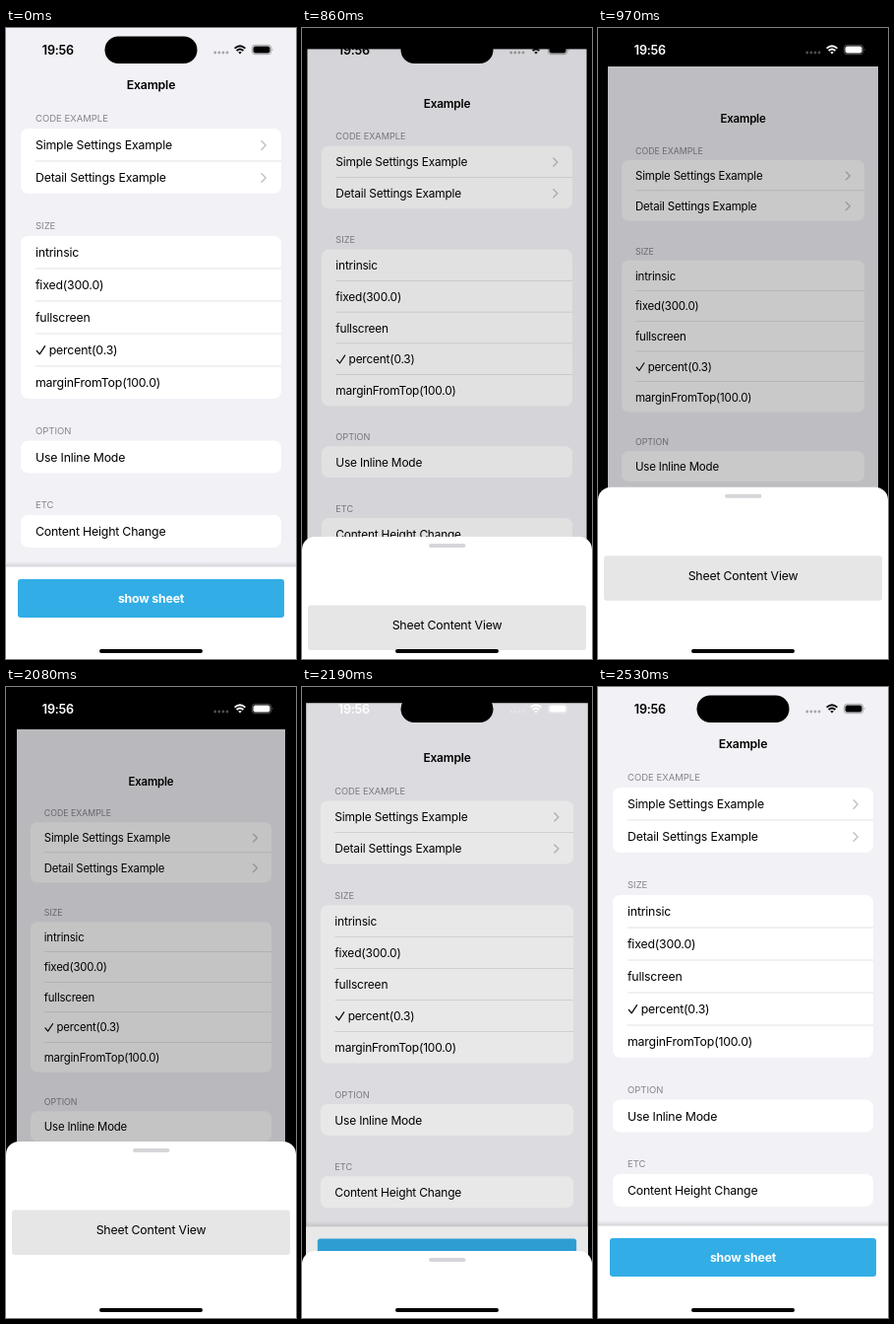
Animation, 295 px wide and 640 px high, one loop 3.33 s. Source, as an HTML page:

```html
<!DOCTYPE html>
<html lang="en">
<head>
<meta charset="utf-8">
<title>Sheet example</title>
<style>
html, body { margin: 0; width: 100%; height: 100%; overflow: hidden; background: #000; }
svg { display: block; width: 100%; height: 100%; }
text { font-family: Inter, sans-serif; font-size: 12.35px; letter-spacing: -.2px; }
.head { font-size: 9.5px; letter-spacing: 0; fill: #85858b; }
.bold { font-weight: 600; }
.mid { text-anchor: middle; }
.line { fill: none; stroke-linecap: round; stroke-linejoin: round; }
</style>
</head>
<body>
<svg viewBox="0 0 295 640">
  <defs>
    <linearGradient id="shade" x1="0" y1="0" x2="0" y2="1">
      <stop offset="0" stop-opacity="0"/>
      <stop offset="1" stop-opacity=".13"/>
    </linearGradient>
  </defs>
  <rect width="295" height="640"/>

  <g id="page">
    <rect width="295" height="640" fill="#f1f1f6"/>
    <text class="bold mid" x="147.5" y="61.5">Example</text>
    <g id="list"></g>
    <rect y="541" width="295" height="6" fill="url(#shade)"/>
    <rect y="546.5" width="295" height="93.5" fill="#fff"/>
    <g id="button">
      <rect x="12" y="559" width="271" height="39" rx="3" fill="#32ade6"/>
      <text class="mid" x="147.5" y="583" fill="#fff" font-weight="700">show sheet</text>
    </g>
    <rect id="dim" width="295" height="640"/>
  </g>

  <rect x="100.5" y="8.5" width="94" height="27.5" rx="13.75"/>
  <g id="status">
    <text class="bold" x="36.8" y="26.5" style="font-size:12.6px">19:56</text>
    <g opacity=".3">
      <circle cx="212.7" cy="25" r="1.4"/><circle cx="216.8" cy="25" r="1.4"/>
      <circle cx="220.9" cy="25" r="1.4"/><circle cx="225" cy="25" r="1.4"/>
    </g>
    <g class="line" stroke="currentColor" stroke-width="1.8" style="stroke-linecap:butt">
      <path d="M232.6 20.6Q238 15.8 243.4 20.6"/>
      <path d="M234.6 23Q238 20 241.4 23"/>
    </g>
    <path d="M236.2 24.6Q238 23.2 239.8 24.6L238 26.6Z"/>
    <rect x="250.3" y="17.3" width="19.4" height="9.4" rx="3" fill="none" stroke="currentColor" stroke-width=".8" opacity=".4"/>
    <rect x="251.5" y="18.5" width="17" height="7" rx="2"/>
    <path d="M270.8 20.5q1.4 1.5 0 3z" opacity=".45"/>
  </g>

  <g id="sheet">
    <rect width="295" height="260" rx="13" fill="#fff"/>
    <rect x="129" y="7" width="37.5" height="4" rx="2" fill="#d6d6da"/>
    <rect x="6" y="69.5" width="283" height="45.5" rx="3" fill="#e6e6e6"/>
    <text class="mid" x="147.5" y="94">Sheet Content View</text>
  </g>
  <rect x="95" y="630" width="105" height="4" rx="2"/>
</svg>
<script>
const $ = id => document.getElementById(id);
const LOOP = 3330, ROW = 33, SHEET_H = 192;
const PRESS = 760, CLOSE = 2080;
// the screen refreshes only at these moments
const TICKS = [0, 760, 860, 970, 1090, 1210, 2080, 2190, 2310, 2420, 2530];

const GROUPS = [
  ['CODE EXAMPLE', 102, ['Simple Settings Example', 'Detail Settings Example'], true],
  ['SIZE', 211, ['intrinsic', 'fixed(300.0)', 'fullscreen', '✓percent(0.3)', 'marginFromTop(100.0)']],
  ['OPTION', 418.5, ['Use Inline Mode']],
  ['ETC', 494, ['Content Height Change']]
];

function row(label, y, first, arrow) {
  const mid = y + ROW / 2;
  const checked = label[0] === '✓';
  let out = `<text x="${checked ? 43.7 : 30}" y="${mid + 4.8}">${checked ? label.slice(1) : label}</text>`;
  if (checked) out += `<path class="line" stroke="#000" stroke-width="1.2" d="M31.3 ${mid + .8}l2.9 3.6 5.4-8.2"/>`;
  if (!first) out += `<rect x="30" y="${y - .3}" width="250" height=".6" fill="#d2d2d6"/>`;
  if (arrow) out += `<path class="line" stroke="#c3c3c7" stroke-width="1.5" d="M260 ${mid - 3.7}l4.2 4.2-4.2 4.2"/>`;
  return out;
}

function group([title, y, labels, arrow]) {
  return `<text class="head" x="30" y="${y - 6.6}">${title}</text>` +
    `<rect x="15" y="${y}" width="265" height="${ROW * labels.length}" rx="7.5" fill="#fff"/>` +
    labels.map((label, i) => row(label, y + i * ROW, !i, arrow)).join('');
}

$('list').innerHTML = GROUPS.map(group).join('');

// critically damped spring, 0 to 1
function spring(ms) {
  const x = Math.max(0, ms) * .0162;
  const v = 1 - (1 + x) * Math.exp(-x);
  return v > .99 ? 1 : v;
}

function draw(ms) {
  const t = TICKS.filter(k => k <= ms).pop();
  let depth = 0, rise = 0;
  if (t >= CLOSE) {
    depth = rise = 1 - spring(t - CLOSE + 26);
  } else if (t > PRESS) {
    depth = spring(t - PRESS - 3);
    rise = spring(t - PRESS + 36);
  }
  const scale = 1 - .08 * depth;
  $('page').setAttribute('transform',
    `translate(${147.5 * (1 - scale)} ${46 * depth}) scale(${scale})`);
  $('dim').setAttribute('opacity', .25 * depth);
  $('button').setAttribute('opacity', t === PRESS ? .2 : 1);
  $('sheet').setAttribute('transform', `translate(0 ${640 - SHEET_H * rise})`);
  const ink = t > 860 && t < 2310 ? '#fff' : '#000';
  $('status').setAttribute('fill', ink);
  $('status').setAttribute('color', ink);
}

const start = performance.now();
function frame() {
  draw((performance.now() - start) % LOOP);
  requestAnimationFrame(frame);
}
frame();
</script>
</body>
</html>
```
